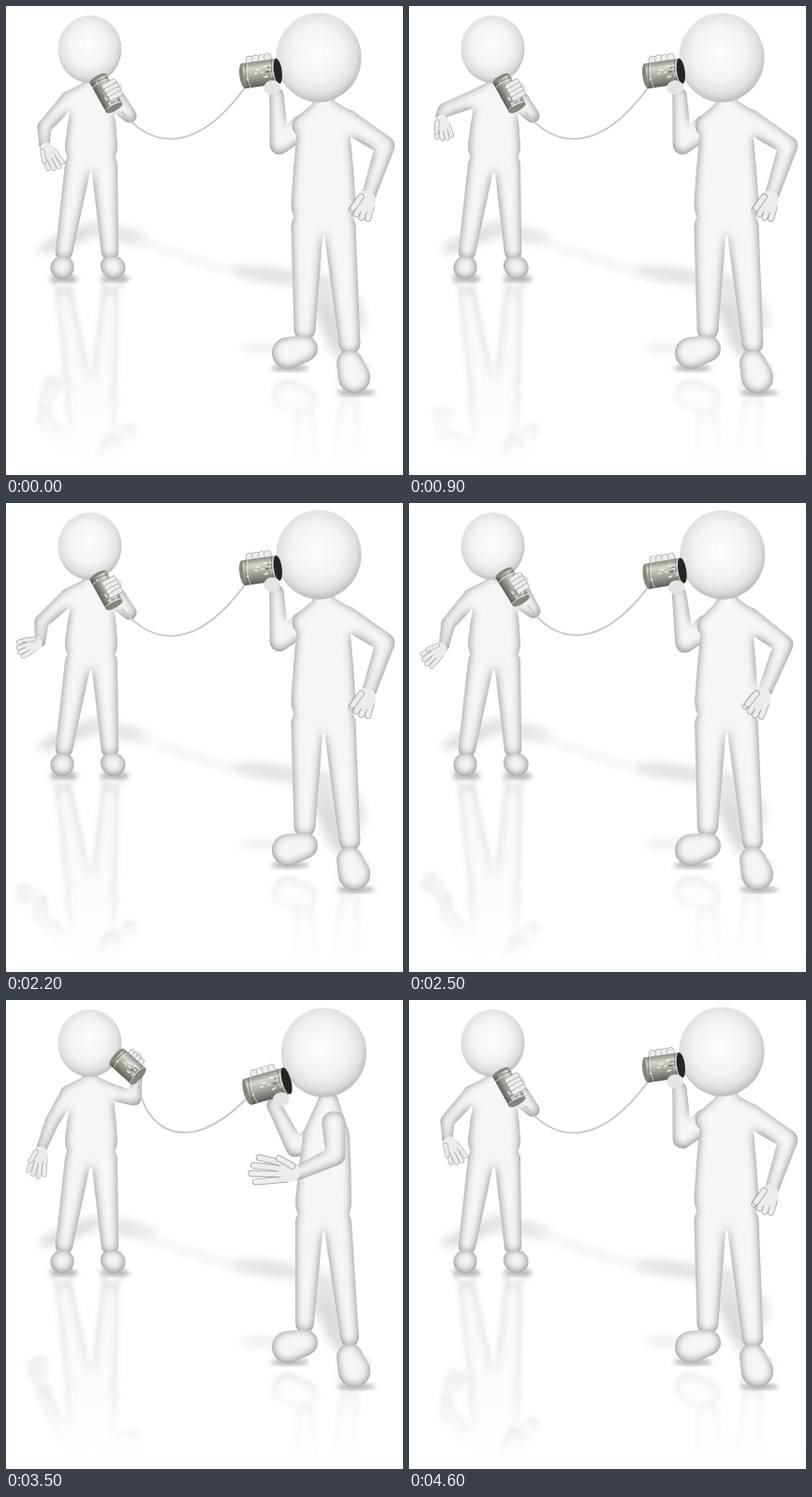
An HTML page that plays this animation: 424 by 500 pixels, repeating every 4.7 s.

```html
<!DOCTYPE html>
<html lang="en">
<head>
<meta charset="utf-8">
<title>Tin can telephone</title>
<style>
html, body { margin: 0; width: 100%; height: 100%; overflow: hidden; background: #fff; }
svg { display: block; width: 100vw; height: 100vh; }
</style>
</head>
<body>
<svg viewBox="0 0 424 500" xmlns="http://www.w3.org/2000/svg">
  <defs>
    <filter id="shade" x="-10%" y="-10%" width="120%" height="120%" color-interpolation-filters="sRGB">
      <feGaussianBlur in="SourceAlpha" stdDeviation="5"/>
      <feOffset dx="-.5" dy="-1.5" result="soft"/>
      <feFlood flood-color="#7c7c7c"/>
      <feComposite operator="in" in2="SourceAlpha"/>
      <feComposite operator="out" in2="soft" result="edge"/>
      <feMerge><feMergeNode in="SourceGraphic"/><feMergeNode in="edge"/></feMerge>
    </filter>
    <filter id="blur" x="-50%" y="-50%" width="200%" height="200%"><feGaussianBlur stdDeviation="5"/></filter>
    <filter id="soften" x="-20%" y="-20%" width="140%" height="140%"><feGaussianBlur stdDeviation="2.5"/></filter>
    <radialGradient id="ball" cx=".48" cy=".45" r=".56">
      <stop offset="0" stop-color="#fdfdfd"/><stop offset=".55" stop-color="#f3f3f3"/>
      <stop offset=".82" stop-color="#e0e0e0"/><stop offset="1" stop-color="#b8b8b8"/>
    </radialGradient>
    <linearGradient id="metal" x2="0" y2="1">
      <stop offset="0" stop-color="#8b8b84"/><stop offset=".25" stop-color="#d5d5cf"/>
      <stop offset=".55" stop-color="#aaaaa3"/><stop offset="1" stop-color="#5c5c56"/>
    </linearGradient>
    <linearGradient id="fade" gradientUnits="userSpaceOnUse" x1="0" y1="290" x2="0" y2="488">
      <stop offset="0" stop-color="#777"/><stop offset=".6" stop-color="#707070"/><stop offset="1" stop-color="#000"/>
    </linearGradient>
    <linearGradient id="fadeNear" gradientUnits="userSpaceOnUse" x1="0" y1="385" x2="0" y2="486">
      <stop offset="0" stop-color="#555"/><stop offset="1" stop-color="#111"/>
    </linearGradient>
    <mask id="floor" maskUnits="userSpaceOnUse" x="0" y="285" width="424" height="215">
      <rect y="285" width="424" height="215" fill="url(#fade)"/>
    </mask>
    <mask id="floorNear" maskUnits="userSpaceOnUse" x="0" y="380" width="424" height="120">
      <rect y="380" width="424" height="106" fill="url(#fadeNear)"/>
    </mask>
  </defs>
  <rect width="424" height="500" fill="#fff"/>
  <g mask="url(#floor)"><use href="#far" transform="matrix(1 0 0 -1 0 570)" filter="url(#soften)"/></g>
  <g mask="url(#floorNear)"><use href="#near" transform="matrix(1 0 0 -1 0 785)" filter="url(#soften)"/></g>
  <g id="shadows"></g>
  <g id="far"></g>
  <path id="string" fill="none" stroke="#c6c6c6" stroke-width="1.8"/>
  <g id="near"></g>
</svg>
<script>
const LOOP = 4700, STEP = 100;
const $ = id => document.getElementById(id);
const ease = k => k * k * (3 - 2 * k);

// Blends numbers, or arrays and objects of them.
function mix(a, b, k) {
  if (typeof a === 'number') return a + (b - a) * k;
  if (Array.isArray(a)) return a.map((v, i) => mix(v, b[i], k));
  return Object.fromEntries(Object.keys(a).map(key => [key, mix(a[key], b[key], k)]));
}

function poseAt(t, poses, schedule) {
  const i = schedule.findIndex(([time]) => time > t);
  if (i < 0) return poses[schedule[schedule.length - 1][1]];
  const [t0, from] = schedule[i - 1], [t1, to] = schedule[i];
  return mix(poses[from], poses[to], ease((t - t0) / (t1 - t0)));
}

// 0: far one speaks, 1: near one speaks.
const turnAt = t => poseAt(t, { far: 0, near: 1 },
  [[0, 'far'], [2400, 'far'], [2800, 'near'], [4200, 'near'], [4600, 'far']]);

const FAR = {
  size: 33,
  body: { neck: [90, 87], chest: [92, 112], pelvis: [91, 150], girth: 28 },
  legs: [{ ankle: [62, 262], toe: [60, 279] }, { ankle: [111, 262], toe: [115, 279] }],
  speak: { arm: [[111, 99], [132, 117], [122, 98]], can: { at: [107, 93], angle: 61, length: 36, r: 10, wrap: 9 } },
  listen: { arm: [[111, 98], [137, 105], [140, 82]], can: { at: [130, 71], angle: 42, length: 31, r: 11.5, wrap: 2 } },
  gestures: {
    rest: { arm: [[67, 100], [41, 129], [41, 148]], angle: 62, reach: .9 },
    out: { arm: [[67, 100], [38, 119], [34, 142]], angle: 152, reach: .7 },
    raised: { arm: [[67, 100], [38, 111], [34, 118]], angle: 80, reach: .7 },
    low: { arm: [[67, 100], [38, 128], [37, 149]], angle: 160, reach: .75 },
    hang: { arm: [[67, 100], [49, 130], [38, 158]], angle: 102, reach: 1 }
  },
  schedule: [[0, 'rest'], [600, 'out'], [900, 'raised'], [1200, 'out'], [1900, 'out'],
    [2300, 'low'], [2800, 'hang'], [4200, 'hang'], [4600, 'rest']]
};
const NEAR = {
  size: 45,
  legs: [{ ankle: [319, 345], toe: [301, 370] }, { ankle: [367, 360], toe: [372, 396] }],
  listen: {
    head: [334, 55], body: { neck: [340, 106], chest: [339, 142], pelvis: [339, 211], girth: 34.5 },
    arm: [[317, 128], [292, 148], [289, 95]], can: { at: [272, 72], angle: -8, length: 37, r: 13.5, wrap: 2 }
  },
  speak: {
    head: [339.5, 56], body: { neck: [344, 108], chest: [342, 148], pelvis: [339, 216], girth: 30 },
    arm: [[328, 148], [309, 157], [286, 112]], can: { at: [279, 92], angle: -16, length: 43, r: 14.5, wrap: 2 }
  },
  gestures: {
    hip: { arm: [[363, 122], [405, 149], [388, 200]], angle: 115, reach: .5 },
    front: { arm: [[358, 130], [373, 160], [338, 203]], angle: 145, reach: .7 },
    offer: { arm: [[350, 131], [352, 166], [312, 184]], angle: 184, reach: 1.3 },
    point: { arm: [[350, 131], [353, 170], [319, 201]], angle: 150, reach: 1.25 }
  },
  schedule: [[0, 'hip'], [2400, 'hip'], [2800, 'front'], [3050, 'front'],
    [3500, 'offer'], [4200, 'point'], [4600, 'hip']]
};

const oval = ([x, y], rx, ry, fill, extra = '') =>
  `<ellipse cx="${x}" cy="${y}" rx="${rx}" ry="${ry}" ${fill ? `fill="${fill}"` : ''} ${extra}/>`;
const shaded = s => `<g fill="#f6f6f6" filter="url(#shade)">${s}</g>`;

// Circles joined by their outer tangents.
function chain(points, radii) {
  let s = '';
  points.forEach((p, i) => {
    s += oval(p, radii[i], radii[i]);
    if (!i) return;
    const q = points[i - 1], dx = p[0] - q[0], dy = p[1] - q[1], d = Math.hypot(dx, dy);
    const slope = (radii[i - 1] - radii[i]) / d;
    if (!(Math.abs(slope) < 1)) return;
    const along = Math.atan2(dy, dx), off = Math.acos(slope);
    const edge = (c, r, a) => [c[0] + r * Math.cos(a), c[1] + r * Math.sin(a)];
    const corners = [edge(q, radii[i - 1], along + off), edge(p, radii[i], along + off),
      edge(p, radii[i], along - off), edge(q, radii[i - 1], along - off)];
    s += `<path d="M${corners.join('L')}Z"/>`;
  });
  return s;
}

const limb = (joints, size) => chain(joints, [.28, .23, .17].map(k => k * size));

function bodyShape({ neck, chest, pelvis, girth: g }, shoulders, legs) {
  const hip = side => [pelvis[0] + side * g / 2, pelvis[1] + g * .7];
  return chain([neck, chest, mix(chest, pelvis, .5), pelvis], [.36 * g, .84 * g, .93 * g, g]) +
    chain([shoulders[0], neck, shoulders[1]], [.33 * g, .28 * g, .33 * g]) +
    legs.map((leg, i) => chain([hip(i * 2 - 1), leg.ankle], [g / 2, g * .33])).join('');
}

const feet = (legs, size) => legs.map(({ ankle: [x, y], toe }) =>
  shaded(chain([[x, y + size * .45], toe], [size * .31, size * .38]))).join('');

function finger(x, y, dx, dy, w) {
  const line = (c, k) =>
    `<path d="M${x},${y}l${dx},${dy}" stroke="${c}" stroke-width="${k}" stroke-linecap="round"/>`;
  return line('#aaa', w) + line('#ececec', w - 1.4);
}
const four = draw => [0, 1, 2, 3].map(draw).join('');

function hand([x, y], angle, reach, size) {
  const fingers = four(i => finger(9, (i - 1.5) * 4, (23 - Math.abs(i - 1.3) * 3) * reach, (i - 1.5) * 2 * reach, 5.4));
  return `<g transform="translate(${x} ${y}) rotate(${angle}) scale(${size / 34})">` +
    fingers + oval([7, 0], 9, 8, '#ececec') + finger(5, 5, 11, 4 * reach, 5.4) + '</g>';
}

// A can and the fingers that hold it; palmSide is -1 or 1 across its axis.
function heldCan({ at, angle, length, r, wrap }, size, palmSide, openFront) {
  const h = length / 2, cap = r * .32, w = size * .18;
  const end = (x, c) => oval([x, 0], cap, r, c);
  const bend = (x, c, k) => `<path d="M${x},${-r}q${-cap},${r} 0,${2 * r}" stroke="${c}" stroke-width="${k}" fill="none" opacity=".6"/>`;
  let seed = 7, glints = '';
  const random = () => (seed = seed * 16807 % 2147483647) / 2147483647;
  for (let i = 0; i < 16; i++)
    glints += oval([(random() - .5) * length * .8, (random() - .6) * r], 1 + random() * 2, .8, random() < .6 ? '#eeeeea' : '#74746c');
  const body = end(-h, '#85857d') +
    `<rect x="${-h}" y="${-r}" width="${length}" height="${2 * r}" fill="url(#metal)"/>` + glints +
    [-.38, .38].map(k => bend(k * length, '#5c5c55', 1) + bend(k * length + 1.5, '#eee', 1)).join('') +
    end(h, openFront ? '#252523' : '#85857d');
  const fingers = four(i => finger((i - 1.5) * w * .8, -r - 3, 0, wrap + 2, w));
  const palm = oval([openFront ? 10 : 0, palmSide * (r + 3)], size * .2, size * .17, '#e4e4e4');
  const parts = openFront ? [fingers, body, palm] : wrap > 5 ? [palm, body, fingers] : [palm, fingers, body];
  return `<g transform="translate(${at}) rotate(${angle})">${parts.join('')}</g>`;
}

function drawFar(t, turn) {
  const { size, body, legs } = FAR;
  const hold = mix(FAR.speak, FAR.listen, turn);
  const { arm, angle, reach } = poseAt(t, FAR.gestures, FAR.schedule);
  $('far').innerHTML =
    shaded(bodyShape(body, [arm[0], hold.arm[0]], legs) + limb(arm, size) + limb(hold.arm, size)) +
    feet(legs, size) + hand(arm[2], angle, reach, size) +
    oval([89.5, 46], 34, 36, 'url(#ball)') + heldCan(hold.can, size, -1, false);
}

function drawNear(t, turn) {
  const { size, legs } = NEAR;
  const hold = mix(NEAR.listen, NEAR.speak, turn);
  const { arm, angle, reach } = poseAt(t, NEAR.gestures, NEAR.schedule);
  const across = turn > .5, armShape = limb(arm, size);
  $('near').innerHTML =
    shaded(limb(hold.arm, size)) +
    shaded(bodyShape(hold.body, [arm[0], hold.arm[0]], legs) + (across ? '' : armShape)) +
    feet(legs, size) + (across ? shaded(armShape) : '') + hand(arm[2], angle, reach, size) +
    oval(hold.head, 45.5, 47.5, 'url(#ball)') + heldCan(hold.can, size, 1, true);
}

function drawShadows(turn) {
  const blob = (x, y, rx, ry, tone, tilt = 0) =>
    oval([x, y], rx, ry, tone, `filter="url(#blur)" transform="rotate(${tilt} ${x} ${y})"`);
  const soles = [FAR, NEAR].flatMap(f => f.legs.map(({ toe: [x, y] }) =>
    oval([x + 2, y + f.size * .36], f.size * .45, 3, '#a9a9a9', 'filter="url(#soften)"')));
  $('shadows').innerHTML =
    blob(68, 248, 36, 8, '#dedede', -22) + blob(118 + 8 * turn, 243, 36, 9, '#e6e6e6', 12) +
    blob(200, 270, 66, 5, '#f4f4f4', 18) + blob(285, 287, 44, 9, '#e4e4e4', 8) +
    blob(348 - 8 * turn, 315, 44 - 14 * turn, 22, '#e6e6e6', 38) +
    blob(348, 345, 10, 32, '#dcdcdc', -20) + blob(272, 364, 22, 6, '#f0f0f0') + soles.join('');
}

function draw(t) {
  const turn = turnAt(t);
  drawShadows(turn);
  drawFar(t, turn);
  drawNear(t, turn);
  const [from, ...rest] = mix([[124, 113], [158, 154], [205, 156], [256, 86]],
    [[141, 86], [146, 137], [192, 170], [256, 106]], turn);
  $('string').setAttribute('d', `M${from}C${rest}`);
}

let shown = -1;
function tick() {
  const t = Math.floor(performance.now() % LOOP / STEP) * STEP;
  if (t !== shown) draw(shown = t);
  requestAnimationFrame(tick);
}
tick();
</script>
</body>
</html>
```
